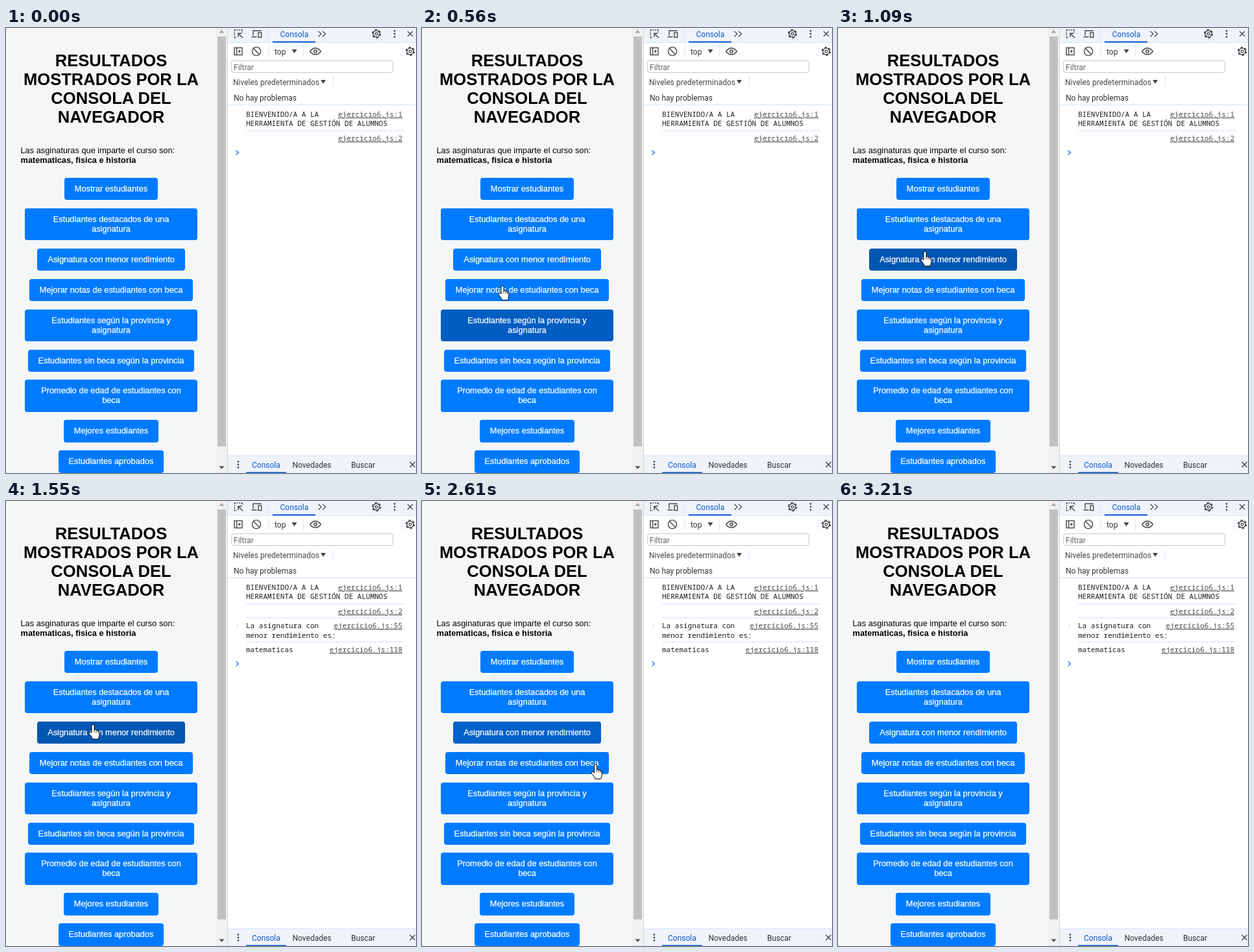
An HTML page that plays this animation: 632 by 686 pixels, repeating every 3.75 s.

```html
<!DOCTYPE html>
<html lang="es">
<head>
<meta charset="utf-8">
<title>Consola</title>
<style>
  html, body { margin: 0; width: 100%; height: 100%; overflow: hidden; background: #fff; }
  svg { display: block; width: 100vw; height: 100vh; }
  .page { font: 12.8px "Liberation Sans", Arial, sans-serif; }
  .title { font-size: 25.6px; font-weight: bold; text-anchor: middle; }
  .label { fill: #fff; stroke: #fff; stroke-width: .25; text-anchor: middle; }
  .ui { font: 12px Roboto, sans-serif; fill: #303134; }
  .mono { font: 11px "Noto Sans Mono", monospace; fill: #1f1f1f; white-space: pre; }
  .link { fill: #474747; text-anchor: end; text-decoration: underline; }
  .blue { fill: #0b57d0; }
  .icon { fill: none; stroke: #474747; stroke-width: 1.4; }
  .rule { fill: none; stroke: #d3e3fd; stroke-width: 1; }
</style>
</head>
<body>
<svg id="stage" viewBox="0 0 632 686" xmlns="http://www.w3.org/2000/svg">
  <defs>
    <g id="gear" class="icon">
      <circle r="6.3" stroke-width="1.8" stroke-dasharray="3.3 3.3"/>
      <circle r="5"/>
      <circle r="1.9"/>
    </g>
    <g id="dots" fill="#474747">
      <circle cy="-4.6" r="1.4"/><circle r="1.4"/><circle cy="4.6" r="1.4"/>
    </g>
    <path id="cross" class="icon" d="M-4-4L4 4M4-4L-4 4"/>
    <path id="drop" fill="#474747" d="M-4-3H4L0 3Z"/>
    <path id="prompt" fill="none" stroke-width="1.4" d="M354.5 188.5L358.5 192L354.5 195.5"/>
  </defs>

  <g class="page">
    <rect width="325" height="686" fill="#f5f7f7"/>
    <g id="title" class="title"></g>
    <text x="22.5" y="193">Las asginaturas que imparte el curso son:</text>
    <text x="22.5" y="208" font-weight="bold">matematicas, fisica e historia</text>
    <g id="buttons"></g>
  </g>

  <rect x="324" width="17" height="686" fill="#f1f1f1"/>
  <rect x="326" y="13" width="13" height="632" fill="#c1c1c1"/>
  <path d="M328.5 7.5H336.5L332.5 3Z" fill="#a3a3a3"/>
  <path d="M328.5 675.5H336.5L332.5 680Z" fill="#505050"/>

  <g class="ui">
    <rect x="341" width="291" height="686" fill="#fff"/>
    <rect x="341" width="291" height="22" fill="#f0f4f9"/>
    <rect x="341" y="660" width="291" height="26" fill="#f0f4f9"/>
    <path class="rule" d="M341 22.5H632M341 118.5H632M341 659.5H632M404.5 0V17M405.5 27V45M458.5 27V45M610.5 27V45M504.5 75V91"/>
    <path d="M341.5 0V686" stroke="#d0d4da"/>

    <!-- tab bar -->
    <g class="icon">
      <path d="M352 3H364" stroke-dasharray="2 1.4"/>
      <path d="M352.2 3V15" stroke-dasharray="2 1.4"/>
      <path d="M364.3 3V7M352 14.8H356" stroke-dasharray="2 1.4"/>
      <path d="M358 14V8.3H363.8M358.5 8.8L365 15.3"/>
      <path d="M381 12V4.2H393.5M378.5 13.8H386.5"/>
      <rect x="389" y="7" width="4.6" height="7.4"/>
      <path d="M481.5 5L486 9L481.5 13.5M488 5L492.5 9L488 13.5" stroke-width="1.2"/>
    </g>
    <text class="blue" x="422.5" y="14">Consola</text>
    <rect class="blue" x="411" y="20.5" width="66" height="2"/>
    <use href="#gear" x="571" y="9"/>
    <use href="#dots" x="599" y="9"/>
    <use href="#cross" x="623" y="9"/>

    <!-- console toolbar -->
    <g class="icon">
      <rect x="352" y="30.5" width="12" height="11"/>
      <path d="M355.7 30.5V41.5"/>
      <path d="M358.7 33.2L362 36L358.7 38.8Z" fill="#474747" stroke="none"/>
      <circle cx="386" cy="36" r="6.6"/>
      <path d="M381.5 31.5L390.5 40.5"/>
      <path d="M468.8 36Q472 31 477 31T485.2 36Q482 41 477 41T468.8 36Z"/>
      <circle cx="477" cy="36" r="2.2"/>
    </g>
    <text x="414" y="41">top</text>
    <use href="#drop" x="444.5" y="36"/>
    <use href="#gear" x="623" y="36"/>
    <rect x="347.5" y="50.5" width="249" height="18" rx="3.5" fill="#fff" stroke="#c7c7c7"/>
    <text x="351" y="65" fill="#5f6368">Filtrar</text>
    <text x="350" y="88" fill="#474747">Niveles predeterminados</text>
    <use href="#drop" x="489" y="83"/>
    <text x="351" y="112">No hay problemas</text>

    <!-- drawer -->
    <use href="#dots" x="358" y="673"/>
    <text class="blue" x="379" y="678">Consola</text>
    <rect class="blue" x="370" y="684.5" width="62" height="1.5"/>
    <text x="441.5" y="678">Novedades</text>
    <text x="532" y="678">Buscar</text>
    <use href="#cross" x="626.5" y="673"/>
  </g>

  <g class="mono">
    <text x="370" y="137">BIENVENIDO/A A LA</text>
    <text x="370" y="151">HERRAMIENTA DE GESTIÓN DE ALUMNOS</text>
    <text class="link" x="611" y="137">ejercicio6.js:1</text>
    <text class="link" x="611" y="174">ejercicio6.js:2</text>
    <path class="rule" d="M370 158.5H614"/>
    <g id="result">
      <path class="rule" d="M370 180.5H614M370 217.5H614"/>
      <text x="370" y="196">La asignatura con</text>
      <text x="370" y="211">menor rendimiento es:</text>
      <text x="370" y="233">matematicas</text>
      <text class="link" x="611" y="196">ejercicio6.js:55</text>
      <text class="link" x="611" y="233">ejercicio6.js:118</text>
      <use href="#prompt" stroke="#dce9f8"/>
    </g>
    <use id="caret" href="#prompt" stroke="#2f7fd6"/>
  </g>

  <g id="cursor" fill="#fff" stroke="#000" stroke-linejoin="round">
    <path id="arrow" d="M0 0V16L3.7 12.5L6.2 18.2L8.6 17.2L6.1 11.6H11.3Z"/>
    <g id="hand">
      <path d="M-2 12V1Q-2-1 0-1Q2-1 2 1V7Q3.8 5.8 5 8Q7 6.6 7.8 9Q9.8 8.2 9.8 11V15Q9.8 18 8 21.5H-.5Q-1.5 18-5.8 13.2Q-6.8 10.8-4.6 10.4Q-3.2 10.6-2 12Z"/>
      <path d="M2 7V11M5 8V11.5M7.8 9V12" fill="none" stroke-width=".8"/>
    </g>
  </g>
</svg>
<script>
const LOOP = 3750, FADE = 300, TICK = 30, CLICK = 1430;
const $ = id => document.getElementById(id);

function add(parent, tag, attrs, text = '') {
  const el = document.createElementNS('http://www.w3.org/2000/svg', tag);
  for (const k in attrs) el.setAttribute(k, attrs[k]);
  el.textContent = text;
  parent.append(el);
  return el;
}

['RESULTADOS', 'MOSTRADOS POR LA', 'CONSOLA DEL', 'NAVEGADOR']
  .forEach((line, i) => add($('title'), 'text', { x: 162, y: 59 + 29 * i }, line));

// top, width, height, label lines
const buttons = [
  [231, 144, 34, 'Mostrar estudiantes'],
  [278, 266, 49, 'Estudiantes destacados de una', 'asignatura'],
  [340, 228, 34, 'Asignatura con menor rendimiento'],
  [387, 252, 34, 'Mejorar notas de estudiantes con beca'],
  [434, 266, 49, 'Estudiantes según la provincia y', 'asignatura'],
  [496, 256, 34, 'Estudiantes sin beca según la provincia'],
  [542, 266, 50, 'Promedio de edad de estudiantes con', 'beca'],
  [604, 146, 35, 'Mejores estudiantes'],
  [651, 162, 35, 'Estudiantes aprobados']
].map(([y, w, h, ...lines]) => {
  const x = 162 - w / 2;
  const rect = add($('buttons'), 'rect', { x, y, width: w, height: h, rx: 4 });
  lines.forEach((line, i) =>
    add($('buttons'), 'text', { class: 'label', x: 162, y: y + 21 + 15 * i }, line));
  return { x, y, w, h, rect, spans: [] };
});

// time, x, y of the pointer tip
const path = [
  [110, 572, 688], [260, 400, 570], [380, 262, 492], [440, 215, 474],
  [530, 142, 437], [560, 124, 398], [620, 129, 362], [640, 129, 362],
  [850, 134, 352], [1090, 134, 345.5], [2400, 134, 345.5], [2520, 200, 368],
  [2550, 222, 379], [2610, 267.5, 407], [2640, 289, 436], [2670, 315, 460],
  [2910, 483, 588], [3210, 571, 690]
];

function pointer(t) {
  if (t < 110 || t >= 3210) return null;
  const start = t < 640 ? 110 : t < 2400 ? 640 : 2400;
  t = start + Math.floor((t - start) / TICK) * TICK;
  const i = path.findIndex(p => p[0] > t);
  const [t0, x0, y0] = path[i - 1], [t1, x1, y1] = path[i];
  const k = (t - t0) / (t1 - t0);
  return [x0 + (x1 - x0) * k, y0 + (y1 - y0) * k];
}

const inside = (b, p) => p && p[0] >= b.x && p[0] <= b.x + b.w && p[1] >= b.y && p[1] <= b.y + b.h;

// hover spans of each button
for (const b of buttons) {
  let since = null;
  for (let t = 0; t < LOOP; t += 10) {
    const over = inside(b, pointer(t));
    if (over && since === null) since = t;
    if (!over && since !== null) {
      b.spans.push([since, t]);
      since = null;
    }
  }
}

// cubic-bezier(.25, .1, .25, 1)
function ease(x) {
  if (x <= 0) return 0;
  if (x >= 1) return 1;
  let lo = 0, hi = 1, s = .5;
  for (let i = 0; i < 16; i++) {
    s = (lo + hi) / 2;
    const bx = .75 * s * (1 - s) + s ** 3;
    if (bx < x) lo = s; else hi = s;
  }
  return .3 * s * (1 - s) ** 2 + 3 * s * s * (1 - s) + s ** 3;
}

function shade(spans, t) {
  let level = 0;
  for (const [on, off] of spans) {
    const peak = ease((Math.min(t, off) - on) / FADE);
    level = Math.max(level, peak * (1 - ease((t - off) / FADE)));
  }
  return level;
}

function draw(t) {
  for (const b of buttons) {
    const k = shade(b.spans, t);
    b.rect.setAttribute('fill', `rgb(0,${Math.round(123 - 37 * k)},${Math.round(255 - 76 * k)})`);
  }
  const p = pointer(t);
  $('cursor').style.display = p ? '' : 'none';
  if (p) {
    const over = buttons.some(b => inside(b, p));
    $('cursor').setAttribute('transform', `translate(${p[0].toFixed(1)} ${p[1].toFixed(1)})`);
    $('hand').style.display = over ? '' : 'none';
    $('arrow').style.display = over ? 'none' : '';
  }
  const done = t >= CLICK;
  $('result').style.display = done ? '' : 'none';
  $('caret').setAttribute('y', done ? 59 : 0);
}

const begin = performance.now();
function loop() {
  draw((performance.now() - begin) % LOOP);
  requestAnimationFrame(loop);
}
loop();
</script>
</body>
</html>
```
